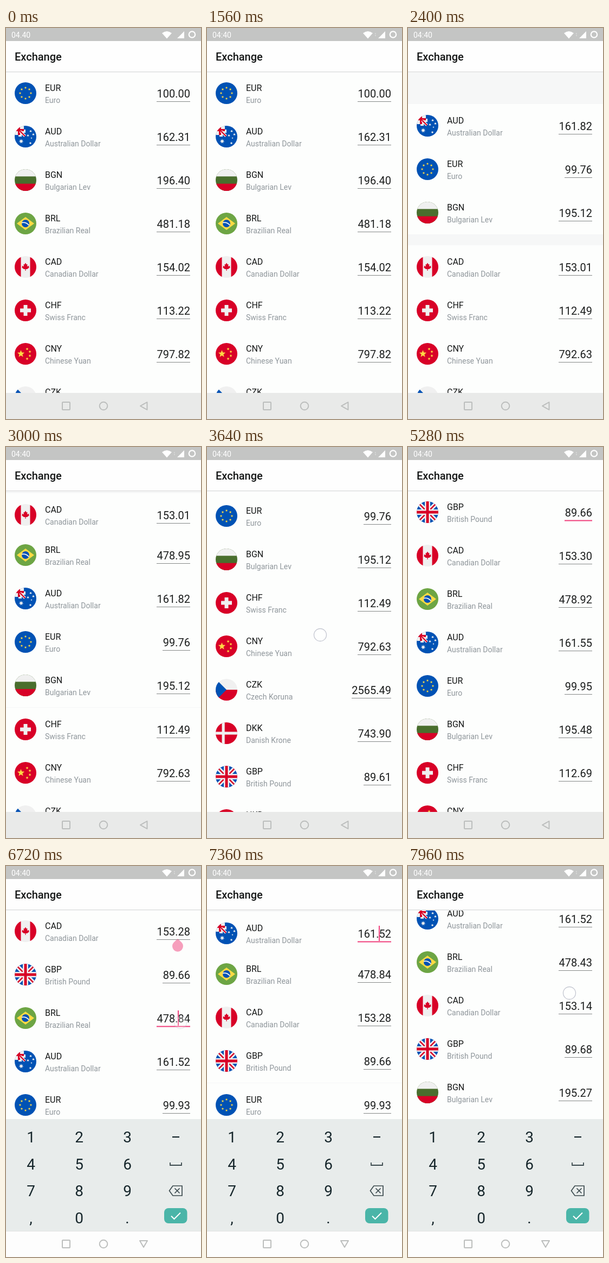
Write an HTML page that moves like this. It is 360 px wide and 720 px high and loops after 8000 ms.

```html
<!DOCTYPE html>
<html lang="en">
<head>
<meta charset="utf-8">
<title>Exchange</title>
<style>
  html, body { margin: 0; width: 100%; height: 100%; overflow: hidden; background: #f6f7f7; }
  svg { display: block; width: 360px; height: 720px; font-family: Roboto, sans-serif; }
  .code { font-size: 16px; fill: #161818; }
  .name { font-size: 14px; fill: #8f969b; }
  .value { font-size: 20px; fill: #1b1d1d; text-anchor: end; }
  .key { font-size: 28px; fill: #16262b; text-anchor: middle; }
</style>
</head>
<body>
<svg id="stage" viewBox="0 0 360 720"></svg>
<script>
const LOOP = 8000, STEP = 40, MOVE = 250;
const RED = '#d80027', BLUE = '#0052b4', WHITE = '#f0f0f0', YELLOW = '#ffda44', GREEN = '#6da544', PINK = '#f0407c';

// Flag helpers, drawn around 0,0 inside a disc of radius 20
const box = (x, y, w, h, fill) => `<rect x="${x}" y="${y}" width="${w}" height="${h}" fill="${fill}"/>`;
const path = (d, fill) => `<path d="${d}" fill="${fill}"/>`;
const line = (d, stroke, width) => `<path d="${d}" fill="none" stroke="${stroke}" stroke-width="${width}"/>`;
const full = fill => box(-20, -20, 40, 40, fill);
const bands = (top, middle, bottom) => full(middle) + box(-20, -20, 40, 13.3, top) + box(-20, 6.7, 40, 13.3, bottom);
const star = (x, y, r, fill, tips = 5) => {
  const points = Array.from({ length: tips * 2 }, (_, i) => {
    const a = i * Math.PI / tips, d = i % 2 ? r * 0.42 : r;
    return `${(x + d * Math.sin(a)).toFixed(2)},${(y - d * Math.cos(a)).toFixed(2)}`;
  });
  return `<polygon points="${points.join(' ')}" fill="${fill}"/>`;
};
const around = (n, draw) => Array.from({ length: n }, (_, i) => draw(i * 2 * Math.PI / n)).join('');
const checks = Array.from({ length: 20 }, (_, i) =>
  box(-6 + (i % 4) * 3, -7 + (i >> 2) * 3, 3, 3, (i + (i >> 2)) % 2 ? WHITE : RED)).join('');

const flags = {
  EUR: full(BLUE) + around(8, a => star(10 * Math.sin(a), -10 * Math.cos(a), 2.5, YELLOW)),
  AUD: full(BLUE) + box(-20, -20, 20, 20, WHITE) + path('M0-20V0H-20V-3H-3V-20Z', BLUE)
    + line('M-10-20V0M-20-10H0', WHITE, 6) + line('M-12-20V-3M-20-12H-3', RED, 4)
    + line('M-10-10L-1-1', WHITE, 5) + line('M-10-10L-1-1', RED, 2.4)
    + star(-8, 8.5, 4.6, WHITE, 7) + star(9, 12, 2.6, WHITE, 7) + star(4.5, -2, 2.6, WHITE, 7)
    + star(9.5, -10, 2.6, WHITE, 7) + star(14.5, -4, 2.6, WHITE, 7) + star(11, 2.5, 1.7, WHITE),
  BGN: bands(WHITE, '#496e2d', RED),
  BRL: full(GREEN) + path('M0-12L16 0 0 12-16 0Z', YELLOW) + `<circle r="7" fill="${BLUE}"/>`
    + line('M-7-1.5Q1-3 6.3 3.2', WHITE, 1.8),
  CAD: full(WHITE) + box(-20, -20, 11.5, 40, RED) + box(8.5, -20, 11.5, 40, RED)
    + path('M0-7.5L2-4.5 3.6-5 3-1 6.5-2.2 6 0 7 1 3 4H.6V7H-.6V4H-3L-7 1-6 0-6.5-2.2-3-1-3.6-5-2-4.5Z', RED),
  CHF: full(RED) + box(-10, -3.5, 20, 7, WHITE) + box(-3.5, -10, 7, 20, WHITE),
  CNY: full(RED) + star(-8.5, 0, 7, YELLOW) + star(3, -9, 2.7, YELLOW) + star(8, -4, 2.7, YELLOW)
    + star(8, 3.5, 2.7, YELLOW) + star(3, 9, 2.7, YELLOW),
  CZK: full(WHITE) + box(-20, 0, 40, 20, RED) + path('M-20-20L0 0-20 20Z', BLUE),
  DKK: full(RED) + box(-20, -2.6, 40, 5.2, WHITE) + box(-8.5, -20, 5.2, 40, WHITE),
  GBP: full(BLUE) + line('M-20-20L20 20M20-20L-20 20', WHITE, 8) + line('M-20-20L20 20M20-20L-20 20', RED, 2.6)
    + line('M0-20V20M-20 0H20', WHITE, 10) + line('M0-20V20M-20 0H20', RED, 5),
  HKD: full(RED) + around(5, a =>
    `<g transform="rotate(${a * 180 / Math.PI})"><ellipse cx="1.4" cy="-6" rx="2.9" ry="4.4" fill="${WHITE}"/>${line('M0-2Q2-4 1.4-7', RED, 0.8)}</g>`),
  HRK: bands(RED, WHITE, BLUE) + path('M-6-7H6V4Q6 8 0 10-6 8-6 4Z', RED) + checks
    + path('M-6-7V-10L-3-9 0-11 3-9 6-10V-7Z', '#338af3'),
  HUF: bands(RED, WHITE, GREEN),
  IDR: full(WHITE) + box(-20, -20, 40, 20, '#a2001d'),
  ILS: full(WHITE) + box(-20, -16, 40, 5.5, BLUE) + box(-20, 10.5, 40, 5.5, BLUE)
    + line('M0-7L6 3.5H-6ZM0 7L6-3.5H-6Z', BLUE, 1.7)
};

// Code: name, then the amounts after each rate update
const currencies = {
  EUR: ['Euro', 100, 99.76, 99.95, 99.93],
  AUD: ['Australian Dollar', 162.31, 161.82, 161.55, 161.52],
  BGN: ['Bulgarian Lev', 196.40, 195.12, 195.48, 195.44, 195.27],
  BRL: ['Brazilian Real', 481.18, 478.95, 478.92, 478.84, 478.43],
  CAD: ['Canadian Dollar', 154.02, 153.01, 153.30, 153.28, 153.14],
  CHF: ['Swiss Franc', 113.22, 112.49, 112.69],
  CNY: ['Chinese Yuan', 797.82, 792.63, 793.40],
  CZK: ['Czech Koruna', 2581.30, 2565.49, 2566.65],
  DKK: ['Danish Krone', 746.10, 743.90, 744.29],
  GBP: ['British Pound', 89.90, 89.61, 89.66, 89.66, 89.68],
  HKD: ['Hong Kong Dollar', 911.10, 911.10, 911.55],
  HRK: ['Croatian Kuna', 741.60, 741.60, 742.02],
  HUF: ['Hungarian Forint', 32570.20, 32570.20, 32587.34],
  IDR: ['Indonesian Rupiah', 1728300.15, 1728300.15, 1729055.44],
  ILS: ['Israeli New Shekel', 416.10, 416.10, 416.29]
};
const codes = Object.keys(currencies);
const updates = [1720, 3880, 6120, 7640];
const moves = [[1560, 'AUD'], [2233.3, 'BRL'], [2770, 'CAD'], [4860, 'GBP'],
  [6200, 'CAD'], [6770, 'BRL'], [7130, 'AUD'], [7480, 'EUR']];
const focuses = [[4760, 'GBP'], [6160, 'CAD'], [6700, 'BRL'], [7100, 'AUD'], [7450, 'EUR']];
// start, end, x, y, follows the scroll
const touches = [[1440, 1560, 200, 200], [2100, 2220, 200, 360], [2680, 2780, 200, 440],
  [3400, 3680, 209, 579, true], [4640, 4760, 200, 231], [6080, 6190, 317, 208],
  [6640, 6750, 322, 288], [7040, 7130, 320, 366], [7390, 7470, 320, 446], [7760, 8000, 298, 337, true]];

const row = code => `<g id="${code}">
  <rect y="-40" width="360" height="80" fill="#fdfefd"/>
  <g transform="translate(36)" clip-path="url(#disc)">${flags[code]}</g>
  <text class="code" x="72" y="-4.3">${code}</text>
  <text class="name" x="72" y="18">${currencies[code][0]}</text>
  <text class="value" x="340" y="8"></text>
  <rect class="rule"/>
  <rect class="cursor" x="317" y="-14" width="2" height="28" fill="${PINK}"/></g>`;
const key = (label, i) => `<text class="key" x="${46 + i % 3 * 89}" y="${509 + (i / 3 | 0) * 49.6}">${label}</text>`;

const stage = document.getElementById('stage');
stage.innerHTML = `
  <clipPath id="disc"><circle r="20"/></clipPath>
  <rect width="360" height="720" fill="#f6f7f7"/>
  <g id="list">${codes.map(row).join('')}</g>
  <path id="handle" d="M0 0L7 6.5A10 10 0 1 1-7 6.5Z" fill="${PINK}"/>
  <circle id="touch" r="11.5" fill="#fff" fill-opacity=".5" stroke="#c3c6d0" stroke-width="1.3"/>
  <rect y="80" width="360" height="2" fill="#eceded"/>
  <rect y="80" width="360" height="1" fill="#dfe0e0"/>
  <rect y="24" width="360" height="56" fill="#fefefe"/>
  <text x="16" y="60" font-size="20" font-weight="500" fill="#141616">Exchange</text>
  <rect width="360" height="24" fill="#c4c5c4"/>
  <text id="clock" x="10" y="17.5" font-size="14" fill="#fff"></text>
  <path d="M288 9.5Q297 2.5 306 9.5L297 19.5ZM329 6V19H316Z" fill="#fff"/>
  <path id="mark" d="M311 9.5V11.5M311 13V15" stroke="#e8e9e8"/>
  <circle cx="343.5" cy="12" r="5.7" fill="none" stroke="#fff" stroke-width="2.2"/>
  <g id="keyboard">
    <rect y="466" width="360" height="206" fill="#e8eceb"/>
    ${[1, 2, 3, 4, 5, 6, 7, 8, 9, ',', 0, '.'].map(key).join('')}
    ${line('M307 499H320', '#16262b', 2.2)}
    ${line('M303 546V551H324V546', '#3b4a4e', 1.8)}
    ${line('M308 589H325V607H308L301.5 598ZM311.5 593.5L320.5 602.5M320.5 593.5L311.5 602.5', '#3b4a4e', 1.7)}
    <rect x="292" y="630" width="42.5" height="28" rx="8" fill="#4ab5a8"/>
    ${line('M305 644.5L310.5 650 322 638.5', '#fff', 2)}
  </g>
  <rect id="nav" y="672" width="360" height="48"/>
  <rect id="navLine" y="672" width="360" height="1" fill="#e3e4e4"/>
  <g fill="none" stroke="#bcbebd" stroke-width="2" stroke-linejoin="round">
    <rect x="104" y="689" width="14" height="14" rx="1"/>
    <circle cx="180" cy="696" r="7.3"/>
    <path id="back"/>
  </g>`;

const $ = id => document.getElementById(id);
const rows = Object.fromEntries(codes.map(code => {
  const g = $(code), find = name => g.querySelector('.' + name);
  return [code, { g, value: find('value'), rule: find('rule'), cursor: find('cursor') }];
}));
const set = (el, attrs) => { for (const name in attrs) el.setAttribute(name, attrs[name]); };
const show = (el, on) => set(el, { visibility: on ? 'visible' : 'hidden' });
const clamp = p => Math.max(0, Math.min(1, p));
const smooth = p => 0.5 - Math.cos(Math.PI * clamp(p)) / 2;

function scrollAt(t) {
  if (t < 3400) return 0;
  if (t < 3640) return 233 * ((t - 3400) / 240) ** 1.6;
  if (t < 4980) return 233 + 376 * (1 - (1 - clamp((t - 3640) / 720)) ** 3);
  if (t < 7760) return 609 * (1 - clamp((t - 4980) / 300)) ** 2;
  return 103 * ((t - 7760) / 200) ** 1.4;
}

// Order of the list, and the fractional slot of every row
function layoutAt(t) {
  let order = codes, slots = code => codes.indexOf(code);
  for (const [start, moved] of moves) {
    if (t < start) break;
    const before = order, after = [moved, ...order.filter(code => code !== moved)];
    const p = smooth((t - start) / MOVE);
    slots = code => before.indexOf(code) * (1 - p) + after.indexOf(code) * p;
    order = after;
  }
  return { order, slots };
}

let drawnOrder = '';
function draw(t) {
  const scroll = scrollAt(t), { order, slots } = layoutAt(t);
  const focus = focuses.filter(([start]) => t >= start).pop()?.[1];
  const version = updates.filter(time => t >= time).length;
  const typing = t >= 6240;

  if (drawnOrder !== order.join()) {
    order.forEach(code => $('list').append(rows[code].g));
    drawnOrder = order.join();
  }
  for (const code of codes) {
    const { g, value, rule, cursor } = rows[code], amounts = currencies[code].slice(1);
    const text = amounts[Math.min(version, amounts.length - 1)].toFixed(2), focused = code === focus;
    set(g, { transform: `translate(0 ${Math.round(120 + 80 * slots(code) - scroll)})` });
    if (value.textContent !== text) value.textContent = text;
    const width = Math.round(value.getComputedTextLength() + 0.5);
    set(rule, { x: 340 - width, y: focused ? 14.5 : 15, width, height: focused ? 2 : 1, fill: focused ? PINK : '#858888' });
    show(cursor, focused && t >= 6160);
  }

  const touch = touches.find(([start, end]) => t >= start && t < end);
  show($('touch'), touch);
  if (touch) {
    const [, end, x, y, drags] = touch;
    set($('touch'), { cx: x, cy: y - (drags ? scroll : 0), opacity: drags ? 1 : clamp((end - t) / 70) });
  }
  show($('handle'), t >= 6460 && t < 6760);
  set($('handle'), { transform: 'translate(317 134)', opacity: t < 6700 ? 1 : 0.5 });

  $('clock').textContent = t < 600 ? '04.40' : '04:40';
  show($('mark'), t >= 600);
  show($('keyboard'), typing);
  set($('keyboard'), { transform: `translate(0 ${206 * (1 - clamp((t - 6240) / 200)) ** 2})` });
  set($('nav'), { fill: typing ? '#fdfdfd' : '#e9eae9' });
  show($('navLine'), typing);
  set($('back'), { d: typing ? 'M247 690H261L254 702Z' : 'M248 696L260.5 689V703Z' });
}

function frame() {
  draw(Math.floor(performance.now() % LOOP / STEP) * STEP);
  requestAnimationFrame(frame);
}
frame();
</script>
</body>
</html>
```
